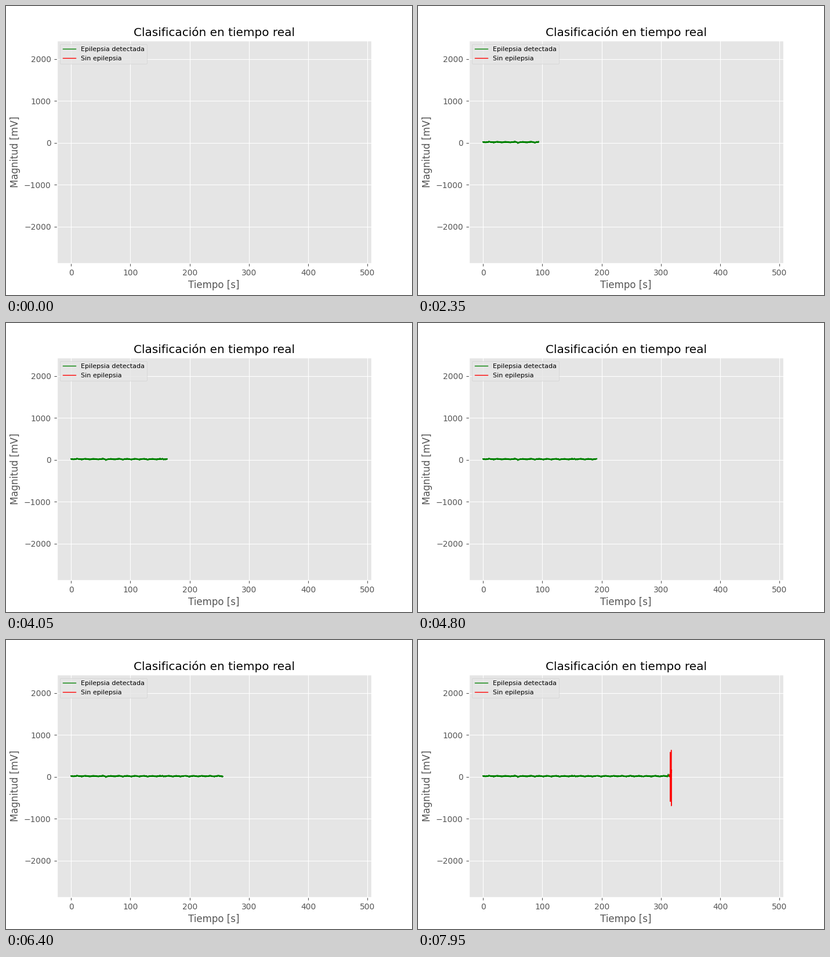
Recreate the animation shown at these times as a matplotlib script. Size 700 by 500 pixels, loop 8000 ms.

```python
import numpy as np
import matplotlib.pyplot as plt
from matplotlib.animation import FuncAnimation

FRAMES = 160
INTERVAL = 50      # ms
STEP = 2           # seconds of signal revealed per frame
RATE = 10          # samples per second
SWITCH = 314       # class change, in seconds


def bump(t, center, height, width=0.5):
    return height * np.exp(-((t - center) / width) ** 2)


def calm_signal(t, rng):
    wave = 6 * np.cos(2 * np.pi * (t - 10.5) / 14)
    y = 19 + wave + rng.uniform(-13, 13, t.size)
    for center, height in [(10, 10), (54, 11), (58.5, -20), (90, 9),
                           (154, 16), (198.5, -14), (312.1, 50)]:
        y += bump(t, center, height)
    return y


def seizure_signal(t, rng):
    base = np.interp(t, [314, 315.4, 316.2, 318], [20, 60, 140, 140])
    y = base + rng.uniform(-35, 35, t.size)
    for when, high, low in [(315.6, 590, -585), (317.3, 640, -690)]:
        i = np.argmin(np.abs(t - when))
        y[i], y[i + 1] = high, low
    return y


rng = np.random.default_rng(4)
time = np.arange(FRAMES * STEP * RATE) / RATE
calm_t = time[time <= SWITCH]
fit_t = time[time >= SWITCH]
calm_y = calm_signal(calm_t, rng)
fit_y = seizure_signal(fit_t, rng)
fit_y[0] = calm_y[-1]

plt.style.use("ggplot")
fig, ax = plt.subplots(figsize=(7, 5), dpi=100)
calm_line, = ax.plot([], [], color="green", lw=1, label="Epilepsia detectada")
fit_line, = ax.plot([], [], color="red", lw=1, label="Sin epilepsia")
ax.set_xlim(-24.1, 506.4)
ax.set_ylim(-2870, 2440)
ax.set_title("Clasificación en tiempo real")
ax.set_xlabel("Tiempo [s]")
ax.set_ylabel("Magnitud [mV]")
ax.legend(loc="upper left", fontsize=8)


def reveal(line, t, y, end):
    shown = t <= end
    line.set_data(t[shown], y[shown])


def update(frame):
    end = frame * STEP if frame else -1
    reveal(calm_line, calm_t, calm_y, end)
    reveal(fit_line, fit_t, fit_y, end if end > SWITCH else -1)
    return calm_line, fit_line


anim = FuncAnimation(fig, update, frames=FRAMES, interval=INTERVAL,
                     repeat=True, repeat_delay=0, blit=False)
plt.show()
```
